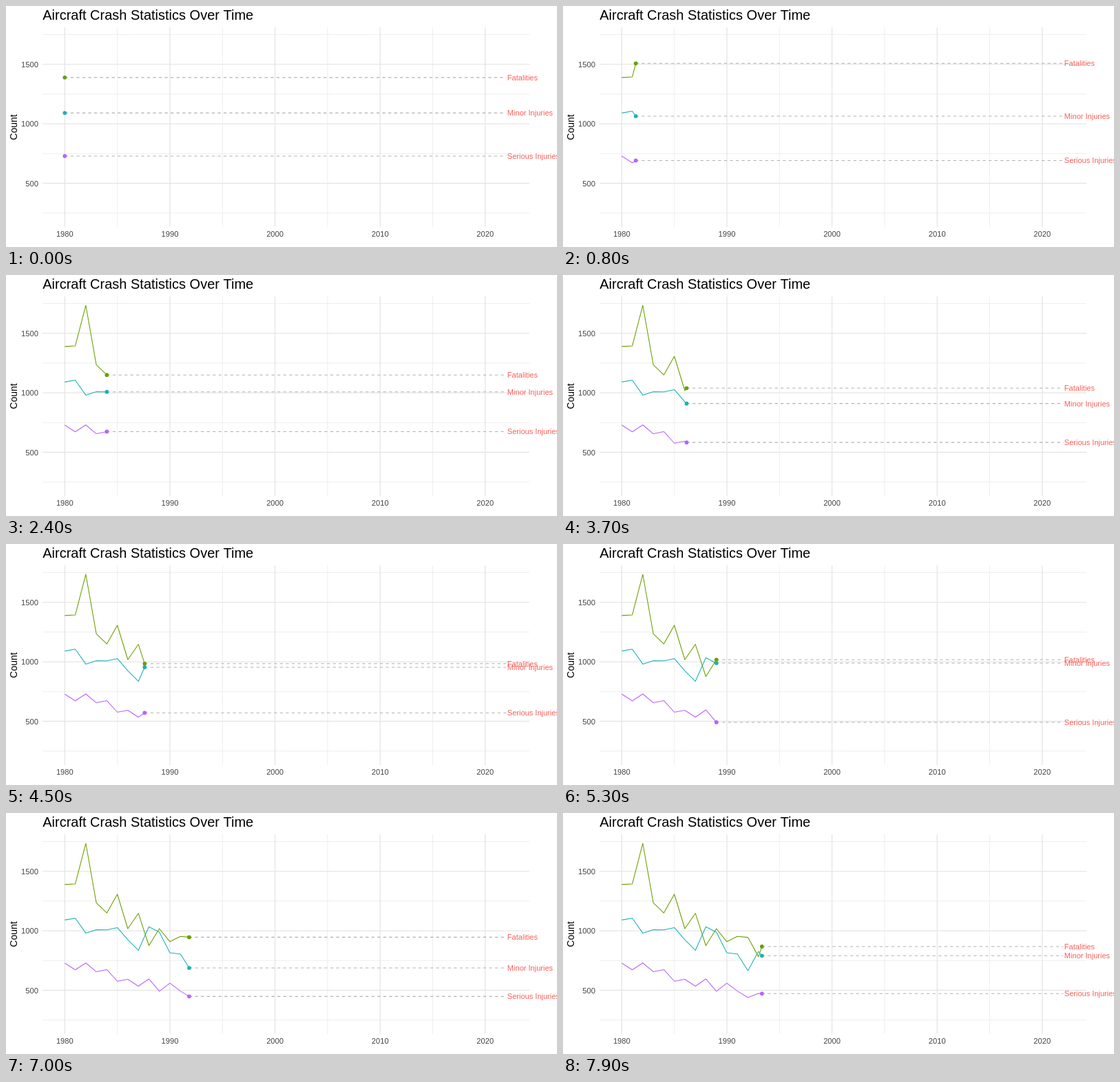
Write an HTML page with a canvas that moves like this. It is 800x350 px and loops after 8 s.

```html
<!DOCTYPE html>
<html lang="en">
<head>
<meta charset="utf-8">
<title>Aircraft Crash Statistics Over Time</title>
<style>
  html, body { margin: 0; width: 100%; height: 100%; overflow: hidden; background: #fff; }
  canvas { display: block; width: 800px; height: 350px; }
</style>
</head>
<body>
<canvas id="chart" width="800" height="350"></canvas>
<script>
const ctx = document.getElementById('chart').getContext('2d');
const FONT = '"Liberation Sans", Arial, sans-serif';
const LOOP = 8000, STEP = 100;
const PANEL = { left: 53.2, right: 760, top: 31, bottom: 321 };
const GRID = '#e6e6e6';

// One value per year from 1980
const series = [
  { name: 'Fatalities', color: '#6a9f00',
    data: [1389, 1394, 1735, 1236, 1150, 1307, 1018, 1147, 876, 1018, 909, 953, 945, 783, 1038] },
  { name: 'Minor Injuries', color: '#1cb0b7',
    data: [1091, 1106, 981, 1009, 1008, 1027, 925, 836, 1034, 989, 816, 805, 665, 827, 719] },
  { name: 'Serious Injuries', color: '#b863ff',
    data: [729, 672, 730, 656, 674, 577, 593, 535, 596, 492, 560, 494, 440, 474, 470] }
];

const xOf = year => 85.33 + (year - 1980) * 15.262;
const yOf = count => 171.1 - (count - 1000) * 0.1729;

// Six steps per year, except the eighth year, which takes five
function yearsAt(step) {
  if (step <= 42) return step / 6;
  if (step <= 47) return 7 + (step - 42) / 5;
  return 8 + (step - 47) / 6;
}

function valueAt(data, years) {
  const i = Math.floor(years);
  const next = data[Math.min(i + 1, data.length - 1)];
  return data[i] + (next - data[i]) * (years - i);
}

function stroke(points, color, width, dash = []) {
  ctx.strokeStyle = color;
  ctx.lineWidth = width;
  ctx.setLineDash(dash);
  ctx.beginPath();
  points.forEach(([x, y]) => ctx.lineTo(x, y));
  ctx.stroke();
}

function text(str, x, y, size, color, align = 'left') {
  ctx.font = `${size}px ${FONT}`;
  ctx.fillStyle = color;
  ctx.textAlign = align;
  ctx.fillText(str, x, y);
}

function gridX(year, width) {
  stroke([[xOf(year), PANEL.top], [xOf(year), PANEL.bottom]], GRID, width);
}

function gridY(count, width) {
  stroke([[PANEL.left, yOf(count)], [PANEL.right, yOf(count)]], GRID, width);
}

function drawAxes() {
  for (let c = 250; c <= 1750; c += 500) gridY(c, 0.68);
  for (let y = 1985; y <= 2015; y += 10) gridX(y, 0.68);
  for (let c = 500; c <= 1500; c += 500) {
    gridY(c, 1.36);
    text(c, 47, yOf(c) + 4, 11.2, '#444', 'right');
  }
  for (let y = 1980; y <= 2020; y += 10) {
    gridX(y, 1.36);
    text(y, xOf(y), 335, 11.2, '#444', 'center');
  }
  text('Aircraft Crash Statistics Over Time', PANEL.left, 19.5, 20, '#000');
  ctx.save();
  ctx.translate(15.6, 176);
  ctx.rotate(-Math.PI / 2);
  text('Count', 0, 0, 14, '#000', 'center');
  ctx.restore();
}

function drawSeries(years) {
  const x = xOf(1980 + years);
  const tips = series.map(s => yOf(valueAt(s.data, years)));

  series.forEach((s, k) => {
    const path = s.data.slice(0, Math.floor(years) + 1)
      .map((v, i) => [xOf(1980 + i), yOf(v)]);
    stroke([...path, [x, tips[k]]], s.color, 1.07);
  });
  tips.forEach(y => stroke([[x, y], [xOf(2022), y]], '#b0b0b0', 1.07, [4.27, 4.27]));
  series.forEach((s, k) => {
    ctx.fillStyle = s.color;
    ctx.beginPath();
    ctx.arc(x, tips[k], 2.85, 0, Math.PI * 2);
    ctx.fill();
  });
  series.forEach((s, k) => text(s.name, xOf(2022.1), tips[k] + 3.9, 11.04, '#f8605a'));
}

function render(now) {
  const step = Math.floor((now % LOOP) / STEP);
  ctx.fillStyle = '#fff';
  ctx.fillRect(0, 0, 800, 350);
  drawAxes();
  drawSeries(yearsAt(step));
}

ctx.lineJoin = 'round';
const start = performance.now();
function tick() {
  render(performance.now() - start);
  requestAnimationFrame(tick);
}
tick();
</script>
</body>
</html>
```
